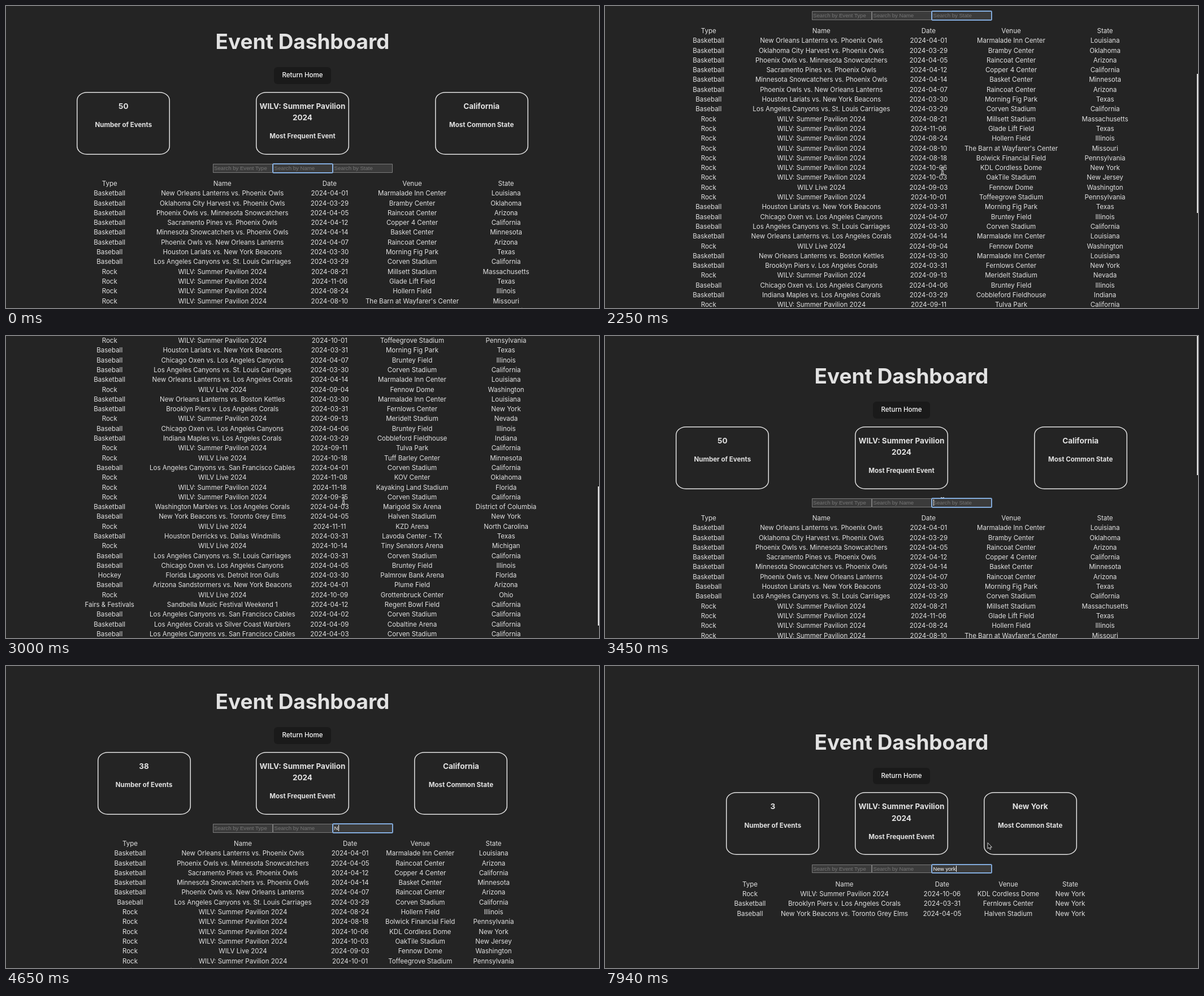
Animation of 1049 by 534 pixels, one loop 8 s. Source, as an HTML page:

```html
<!DOCTYPE html>
<html lang="en">
<head>
<meta charset="utf-8">
<title>Event Dashboard</title>
<style>
  html, body { margin: 0; width: 100%; height: 100%; overflow: hidden; background: #242424; }
  body {
    position: relative; color: #e2e2e2;
    font: 400 11.53px/17.3px Inter, sans-serif;
    font-optical-sizing: none; white-space: nowrap;
  }
  #page { position: absolute; left: 0; top: 0; width: 1049px; height: 534px; }
  #page > * { position: absolute; }
  h1, h3, h4 { margin: 0; font-weight: 700; text-align: center; }
  h1 { left: 0; top: 43px; width: 1049px; font-size: 36.9px; line-height: 40.6px; }
  .button {
    left: 474px; top: 108px; width: 101px; height: 29.5px; border-radius: 6px;
    background: #1a1a1a; color: #fff; font-weight: 500; line-height: 29.5px; text-align: center;
  }
  #cards { top: 151.5px; display: flex; justify-content: space-between; }
  .card {
    width: 165px; height: 111px; box-sizing: border-box; padding-top: 15px;
    border-radius: 18px / 15px; box-shadow: inset 0 0 0 1.5px #e2e2e2;
  }
  h3 { font-size: 13.5px; line-height: 20.2px; margin-bottom: 15.3px; }
  .field {
    top: 279px; width: 106px; height: 15.5px; box-sizing: border-box; padding-left: 2.6px;
    background: #3b3b3b; color: #757575; box-shadow: inset 0 0 0 1px #7b7b7b; border-radius: 1px;
    font: 9.6px/15.5px "Liberation Sans", Arial, sans-serif; white-space: pre;
  }
  .field.focus { box-shadow: inset 0 0 0 1px #8fbdf5, 0 0 0 .7px #8fbdf5; z-index: 1; }
  .field.typed { color: #fff; }
  .caret { display: inline-block; width: 1px; height: 11px; margin-right: -1px; background: #fff; vertical-align: -2px; }
  #table { top: 306px; display: grid; column-gap: 29.6px; grid-auto-rows: 17.3px; }
  #table span { display: flex; justify-content: center; }
  #thumb { position: absolute; right: 0; width: 2px; height: 246px; background: #e4e4e4; }
  #pointer { position: absolute; left: 0; top: 0; width: 24px; height: 24px; overflow: visible; }
</style>
</head>
<body>
<div id="page">
  <h1>Event Dashboard</h1>
  <div class="button">Return Home</div>
  <div id="cards">
    <div class="card"><h3 id="count"></h3><h4>Number of Events</h4></div>
    <div class="card"><h3>WILV: Summer Pavilion<br>2024</h3><h4>Most Frequent Event</h4></div>
    <div class="card"><h3 id="state"></h3><h4>Most Common State</h4></div>
  </div>
  <div class="field" style="left:365.5px">Search by Event Type</div>
  <div class="field" id="nameField" style="left:472px"></div>
  <div class="field" id="stateField" style="left:578px"></div>
  <div id="table"></div>
</div>
<div id="thumb"></div>
<svg id="pointer">
  <g id="beam" fill="none">
    <path id="beamShape" stroke="#eee" stroke-width="2.4" d="M-3-5.5Q0-5.5 0-3V3Q0 5.5-3 5.5M3-5.5Q0-5.5 0-3M0 3Q0 5.5 3 5.5M-2 2H2"/>
    <use href="#beamShape" style="stroke-width:1"/>
    <path stroke="#222" d="M-3-5.5Q0-5.5 0-3V3Q0 5.5-3 5.5M3-5.5Q0-5.5 0-3M0 3Q0 5.5 3 5.5M-2 2H2"/>
  </g>
  <path id="arrow" fill="#111" stroke="#eee" stroke-width=".9" d="M0 0V10.6L2.4 8.4L4 12L5.7 11.2L4.2 7.8H7.4Z"/>
</svg>
<script>
const $ = id => document.getElementById(id);
const LOOP = 8000, CENTER = 524.5, GAP = 29.6, ROW = 17.3;

const types = { b: 'Basketball', s: 'Baseball', r: 'Rock', h: 'Hockey', f: 'Fairs & Festivals' };
const tours = { summer: 'WILV: Summer Pavilion 2024', live: 'WILV Live 2024' };

// type | name | month-day | venue | state
const events = `b|New Orleans Lanterns vs. Phoenix Owls|04-01|Marmalade Inn Center|Louisiana
b|Oklahoma City Harvest vs. Phoenix Owls|03-29|Bramby Center|Oklahoma
b|Phoenix Owls vs. Minnesota Snowcatchers|04-05|Raincoat Center|Arizona
b|Sacramento Pines vs. Phoenix Owls|04-12|Copper 4 Center|California
b|Minnesota Snowcatchers vs. Phoenix Owls|04-14|Basket Center|Minnesota
b|Phoenix Owls vs. New Orleans Lanterns|04-07|Raincoat Center|Arizona
s|Houston Lariats vs. New York Beacons|03-30|Morning Fig Park|Texas
s|Los Angeles Canyons vs. St. Louis Carriages|03-29|Corven Stadium|California
r|summer|08-21|Millsett Stadium|Massachusetts
r|summer|11-06|Glade Lift Field|Texas
r|summer|08-24|Hollern Field|Illinois
r|summer|08-10|The Barn at Wayfarer's Center|Missouri
r|summer|08-18|Bolwick Financial Field|Pennsylvania
r|summer|10-06|KDL Cordless Dome|New York
r|summer|10-03|OakTile Stadium|New Jersey
r|live|09-03|Fennow Dome|Washington
r|summer|10-01|Toffeegrove Stadium|Pennsylvania
s|Houston Lariats vs. New York Beacons|03-31|Morning Fig Park|Texas
s|Chicago Oxen vs. Los Angeles Canyons|04-07|Bruntey Field|Illinois
s|Los Angeles Canyons vs. St. Louis Carriages|03-30|Corven Stadium|California
b|New Orleans Lanterns vs. Los Angeles Corals|04-14|Marmalade Inn Center|Louisiana
r|live|09-04|Fennow Dome|Washington
b|New Orleans Lanterns vs. Boston Kettles|03-30|Marmalade Inn Center|Louisiana
b|Brooklyn Piers v. Los Angeles Corals|03-31|Fernlows Center|New York
r|summer|09-13|Meridelt Stadium|Nevada
s|Chicago Oxen vs. Los Angeles Canyons|04-06|Bruntey Field|Illinois
b|Indiana Maples vs. Los Angeles Corals|03-29|Cobbleford Fieldhouse|Indiana
r|summer|09-11|Tulva Park|California
r|live|10-18|Tuff Barley Center|Minnesota
s|Los Angeles Canyons vs. San Francisco Cables|04-01|Corven Stadium|California
r|live|11-08|KOV Center|Oklahoma
r|summer|11-18|Kayaking Land Stadium|Florida
r|summer|09-15|Corven Stadium|California
b|Washington Marbles vs. Los Angeles Corals|04-03|Marigold Six Arena|District of Columbia
s|New York Beacons vs. Toronto Grey Elms|04-05|Halven Stadium|New York
r|live|11-11|KZD Arena|North Carolina
b|Houston Derricks vs. Dallas Windmills|03-31|Lavoda Center - TX|Texas
r|live|10-14|Tiny Senators Arena|Michigan
s|Los Angeles Canyons vs. St. Louis Carriages|03-31|Corven Stadium|California
s|Chicago Oxen vs. Los Angeles Canyons|04-05|Bruntey Field|Illinois
h|Florida Lagoons vs. Detroit Iron Gulls|03-30|Palmrow Bank Arena|Florida
s|Arizona Sandstormers vs. New York Beacons|04-01|Plume Field|Arizona
r|live|10-09|Grottenbruck Center|Ohio
f|Sandbella Music Festival Weekend 1|04-12|Regent Bowl Field|California
s|Los Angeles Canyons vs. San Francisco Cables|04-02|Corven Stadium|California
b|Los Angeles Corals vs Silver Coast Warblers|04-09|Cobaltine Arena|California
s|Los Angeles Canyons vs. San Francisco Cables|04-03|Corven Stadium|California
r|live|10-20|Gablette Bank Arena|Nebraska
s|Arizona Sandstormers vs. New York Beacons|04-03|Plume Field|Arizona
s|Arizona Sandstormers vs. New York Beacons|04-02|Plume Field|Arizona`
  .split('\n').map(line => {
    const [type, name, day, venue, state] = line.split('|');
    return [types[type], tours[name] || name, '2024-' + day, venue, state];
  });

// Column widths by query length
const four = [55.5, 219.5, 67, 108, 64];
const columns = [
  [87, 253, 67, 166, 107],
  [87, 253, 67, 122, 78.5],
  [55.5, 232, 67, 112, 64],
  four, four,
  [55.5, 219.5, 67, 108, 52]
];

// Tracks: [start time, value...], held until the next entry
const queries = [[0, ''], [4650, 'N'], [4940, 'Ne'], [5240, 'New'], [5990, 'New '],
  [6740, 'New y'], [7340, 'New yo'], [7490, 'New yor'], [7640, 'New york']];
const carets = [[0, 0], [450, 1], [900, 0], [1350, 1], [1800, 0], [2400, 1], [2850, 0], [3300, 1],
  [3900, 0], [4350, 1], [5690, 0], [5990, 1], [6440, 0], [6740, 1], [7190, 0], [7340, 1]];
const scrolls = [[0, 0], [2100, 45], [2250, 270], [2400, 590], [2550, 680], [2700, 678], [2850, 677],
  [3000, 600], [3150, 300], [3300, 40], [3450, -8], [3600, -3], [3750, 0]];
const pointers = [[0, 513, 285.5], [900, 530, 288], [1050, 562, 292], [1200, 588, 295], [1350, 593, 295],
  [1650, 595, 294], [1800, 597, 292], [4650, 607, 287], [5090, 607, 285.5], [7940, 677, 312.5]];

const at = (track, t) => track.findLast(entry => entry[0] <= t).slice(1);

function mostCommon(list) {
  const counts = new Map();
  for (const item of list) counts.set(item, (counts.get(item) || 0) + 1);
  return [...counts].reduce((best, entry) => entry[1] > best[1] ? entry : best)[0];
}

let shownQuery = null, pageOffset = 0;

function showResults(query) {
  const rows = events.filter(row => row[4].toLowerCase().includes(query.toLowerCase()));
  const widths = columns[Math.min(query.length, columns.length - 1)];
  const total = widths.reduce((sum, w) => sum + w, 4 * GAP);
  const left = CENTER - total / 2;

  $('cards').style.left = left + 'px';
  $('cards').style.width = total + 'px';
  $('count').textContent = rows.length;
  $('state').textContent = mostCommon(rows.map(row => row[4]));

  const table = $('table');
  table.style.left = left + 14.4 + 'px';
  table.style.gridTemplateColumns = widths.map(w => w + 'px').join(' ');
  table.replaceChildren(...[['Type', 'Name', 'Date', 'Venue', 'State'], ...rows].flat().map(text => {
    const cell = document.createElement('span');
    cell.textContent = text;
    return cell;
  }));
  pageOffset = Math.max(0, 63.2 - (rows.length - 4) * ROW / 2);
  shownQuery = query;
}

function showField(field, label, text, focused, caretOn) {
  const caret = focused && caretOn ? '<i class="caret"></i>' : '';
  const html = text ? text + caret : caret + label;
  field.className = 'field' + (focused ? ' focus' : '') + (text ? ' typed' : '');
  if (field.dataset.html !== html) field.innerHTML = field.dataset.html = html;
}

function draw() {
  const t = performance.now() % LOOP;
  const [query] = at(queries, t), [caret] = at(carets, t);
  const [scroll] = at(scrolls, t), [x, y] = at(pointers, t);
  const inState = t >= 1350;

  if (query !== shownQuery) showResults(query);
  showField($('nameField'), 'Search by Name', '', !inState, caret);
  showField($('stateField'), 'Search by State', query, inState, caret);
  $('page').style.top = pageOffset - scroll + 'px';

  $('thumb').style.display = t >= 2100 && t < 4050 ? '' : 'none';
  $('thumb').style.top = Math.max(0, scroll) * 302 / 680 + 'px';

  const isArrow = t >= 5090;
  $('beam').style.display = isArrow ? 'none' : '';
  $('arrow').style.display = isArrow ? '' : 'none';
  $('pointer').style.transform = `translate(${x}px, ${y}px)`;
  requestAnimationFrame(draw);
}
draw();
</script>
</body>
</html>
```
